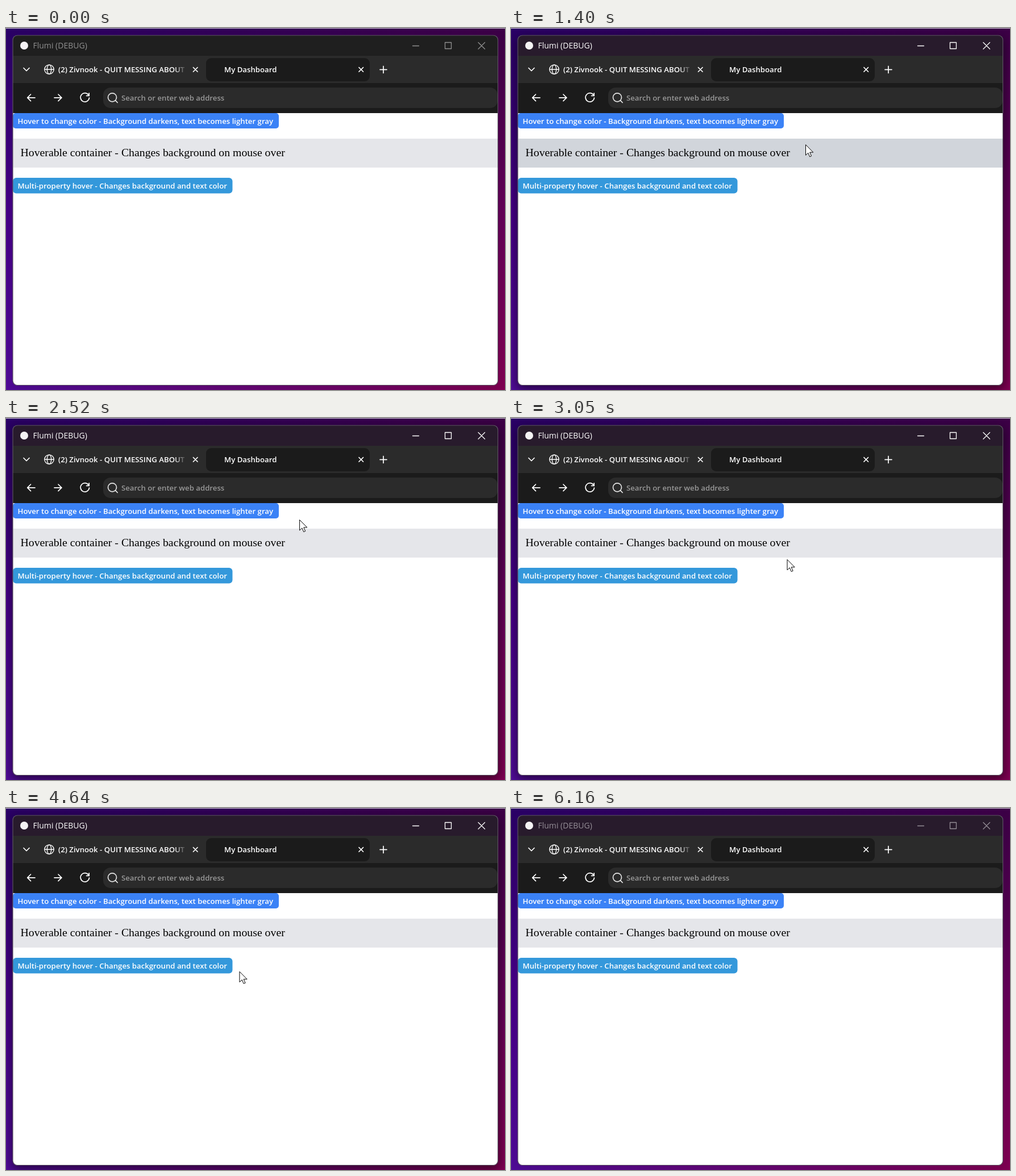
These frames come from a looping animation (878x638 px, 6.23 s). An HTML page:

```html
<!DOCTYPE html>
<html lang="en">
<head>
<meta charset="utf-8">
<title>Hover demo</title>
<style>
  html, body { margin: 0; width: 100%; height: 100%; overflow: hidden; background: #2b0050; }
  svg { display: block; width: 100%; height: 100%; }
  text { font: 600 13.2px "Open Sans", sans-serif; fill: #fff; white-space: pre; }
  .title { font-weight: 400; font-size: 14px; }
  .serif { font: 19.8px "Liberation Serif", serif; fill: #000; }
  .line { fill: none; stroke: #fff; stroke-width: 1.7; stroke-linecap: round; stroke-linejoin: round; }
  .thin { stroke-width: 1.3; }
</style>
</head>
<body>
<svg viewBox="0 0 878 638" xmlns="http://www.w3.org/2000/svg">
  <defs>
    <linearGradient id="left" x2="0" y2="1">
      <stop stop-color="#2a0066"/><stop offset=".5" stop-color="#470088"/><stop offset="1" stop-color="#500c98"/>
    </linearGradient>
    <linearGradient id="right" x2="0" y2="1">
      <stop stop-color="#3c0046"/><stop offset=".5" stop-color="#640058"/><stop offset="1" stop-color="#800052"/>
    </linearGradient>
    <linearGradient id="across">
      <stop stop-color="#fff" stop-opacity="0"/><stop offset="1" stop-color="#fff"/>
    </linearGradient>
    <linearGradient id="fade" gradientUnits="userSpaceOnUse" x1="296" x2="318">
      <stop stop-color="#fff"/><stop offset="1" stop-color="#fff" stop-opacity="0"/>
    </linearGradient>
    <mask id="blend"><rect width="878" height="638" fill="url(#across)"/></mask>
    <mask id="tabFade"><rect x="88" y="55" width="230" height="36" fill="url(#fade)"/></mask>
    <clipPath id="frame"><rect x="12" y="13" width="853.5" height="616.5" rx="8"/></clipPath>
    <filter id="soft" x="-10%" y="-10%" width="120%" height="120%"><feGaussianBlur stdDeviation="9"/></filter>
  </defs>

  <rect width="878" height="638" fill="url(#left)"/>
  <rect width="878" height="638" fill="url(#right)" mask="url(#blend)"/>
  <rect id="shadow" x="10" y="16" width="858" height="622" rx="10" filter="url(#soft)"/>
  <rect width="878" height="1" fill="#cfcbd6"/>

  <g clip-path="url(#frame)">
    <rect x="12" y="13" width="854" height="617" fill="#fff"/>
    <rect id="bar" x="12" y="13" width="854" height="37"/>
    <rect x="12" y="49" width="854" height="48" fill="#2b2b2b"/>
    <rect x="12" y="97" width="854" height="53" fill="#1b1b1b"/>
    <rect x="352" y="53" width="288" height="41" rx="9" fill="#1b1b1b"/>
    <rect x="171" y="105" width="694" height="36" rx="13" fill="#2b2b2b"/>

    <circle cx="32" cy="31" r="7" fill="#f4f2f4"/>
    <g id="caption">
      <text class="title" x="47.5" y="36">Flumi (DEBUG)</text>
      <path class="line thin" d="M715.5 31.5h11M772.5 25.5h11v11h-11zM831 25.5l11.5 11.5M842.5 25.5L831 37"/>
    </g>

    <path class="line" d="M31 70.5l5 5 5-5M329.5 69.5l7.5 7.5M337 69.5l-7.5 7.5M621 69.5l7.5 7.5M628.5 69.5l-7.5 7.5M658 73.3h12M664 67.3v12"/>
    <g class="line thin">
      <circle cx="76" cy="73" r="8.2"/><ellipse cx="76" cy="73" rx="3.7" ry="8.2"/><path d="M68 73h16"/>
    </g>
    <g mask="url(#tabFade)"><text x="92" y="78">(2) Zivnook - QUIT MESSING ABOUT NOW</text></g>
    <text x="384" y="78">My Dashboard</text>

    <path class="line" d="M51 122.8H38M43.5 117l-5.8 5.8 5.8 5.8M85 122.8h13M92 117l5.8 5.8-5.8 5.8M145.5 118.5a7.7 7.7 0 1 0 1 4.5M146.2 114.8v4.6h-4.6"/>
    <path class="line" style="stroke:#e4e4e4" d="M194.5 122.3a7.5 7.5 0 1 1-15 0a7.5 7.5 0 1 1 15 0M192.5 127.6l3.7 3.9"/>
    <text x="203" y="128" style="fill:#989898">Search or enter web address</text>

    <rect id="blue" x="12" y="150" width="468" height="27" rx="5"/>
    <text id="blueText" x="20.5" y="168.5">Hover to change color - Background darkens, text becomes lighter gray</text>
    <rect id="panel" x="13" y="195" width="853" height="51"/>
    <text class="serif" x="25.5" y="226">Hoverable container - Changes background on mouse over</text>
    <rect id="multi" x="12" y="264" width="386.5" height="27.5" rx="6"/>
    <text id="multiText" x="20.5" y="283">Multi-property hover - Changes background and text color</text>
  </g>
  <rect x="12" y="13" width="853.5" height="616.5" rx="8" fill="none" stroke="#5c5562" stroke-width="1.2"/>

  <g id="pointer" stroke="#000" fill="#fff" stroke-linejoin="round">
    <circle id="press" r="15" cy="-1" fill="#e8e337" fill-opacity=".75" stroke="none"/>
    <path id="arrow" d="M.5.5V19L4.8 14.9l2.9 6.8 2.9-1.3-2.9-6.5h6z"/>
    <path id="hand" d="M-2 2a2 2 0 0 1 4 0v7c0-2 3.5-2 3.5 0v1c0-2 3.3-2 3.3.3v1c0-1.8 2.9-1.8 2.9.5v5.5c0 3-2 4.5-2 7.2H0c0-2.5-4-5.3-6.6-9.5-1.4-2.4 1.2-3.5 2.6-2l2 2.2zM2 9v4M5.5 10v3M8.8 11v2.5"/>
  </g>
</svg>
<script>
const LOOP = 6230, FRAME = LOOP / 94;
const $ = id => document.getElementById(id);
const set = (id, name, value) => $(id).setAttribute(name, value);
const show = (id, on) => set(id, 'visibility', on ? 'visible' : 'hidden');
const ease = k => k < 0.5 ? 4 * k ** 3 : 1 - 4 * (1 - k) ** 3;

// Arrival time, x, y: the pointer eases from each stop to the next
const stops = [
  [270, 498, 174], [860, 464, 172], [1070, 518, 179],
  [1470, 518, 206], [1800, 518, 184], [2060, 517.5, 195], [2260, 518, 214],
  [2600, 516, 177], [2850, 489, 222], [3050, 485.5, 249],
  [3650, 388, 281], [3910, 423.5, 289], [4310, 386, 282], [4710, 411, 288],
  [5170, 393, 284], [5310, 393, 284], [5900, 799.5, 617]
];

function pointerAt(t) {
  const i = stops.findLastIndex(s => s[0] <= t);
  const [t0, x0, y0] = stops[i];
  const [t1, x1, y1] = stops[i + 1] || [LOOP, x0, y0];
  const k = ease((t - t0) / (t1 - t0));
  return [x0 + (x1 - x0) * k, y0 + (y1 - y0) * k];
}

function draw(t) {
  const focused = t >= 70 && t < 6160;
  set('bar', 'fill', t < 70 ? '#1f1f1f' : '#281b2c');
  set('caption', 'opacity', focused ? 1 : 0.5);
  set('shadow', 'opacity', focused ? 0.5 : 0.1);

  const active = t >= 270 && t < 5970;
  const snapped = Math.max(270, Math.ceil(Math.floor(t / FRAME + 0.1) * FRAME));
  const [x, y] = active ? pointerAt(snapped) : [-99, -99];
  const within = (right, top, bottom) => x > 12 && x < right && y > top && y < bottom;
  const onBlue = within(480, 150, 177);
  const onPanel = within(865, 195.5, 246);
  const onMulti = within(399, 264, 291);
  set('blue', 'fill', onBlue ? '#2563eb' : '#3b82f6');
  set('blueText', 'style', onBlue ? 'fill:#e5e7eb' : '');
  set('panel', 'fill', onPanel ? '#d1d5db' : '#e5e6ea');
  set('multi', 'fill', onMulti ? '#2980b9' : '#3498db');
  set('multiText', 'style', onMulti ? 'fill:#ecf0f1' : '');

  set('pointer', 'transform', `translate(${x} ${y})`);
  show('arrow', active && !onBlue && !onMulti);
  show('hand', onBlue || onMulti);
  show('press', t >= 5310 && t < 5420);
}

function tick() {
  draw(performance.now() % LOOP);
  requestAnimationFrame(tick);
}
tick();
</script>
</body>
</html>
```
